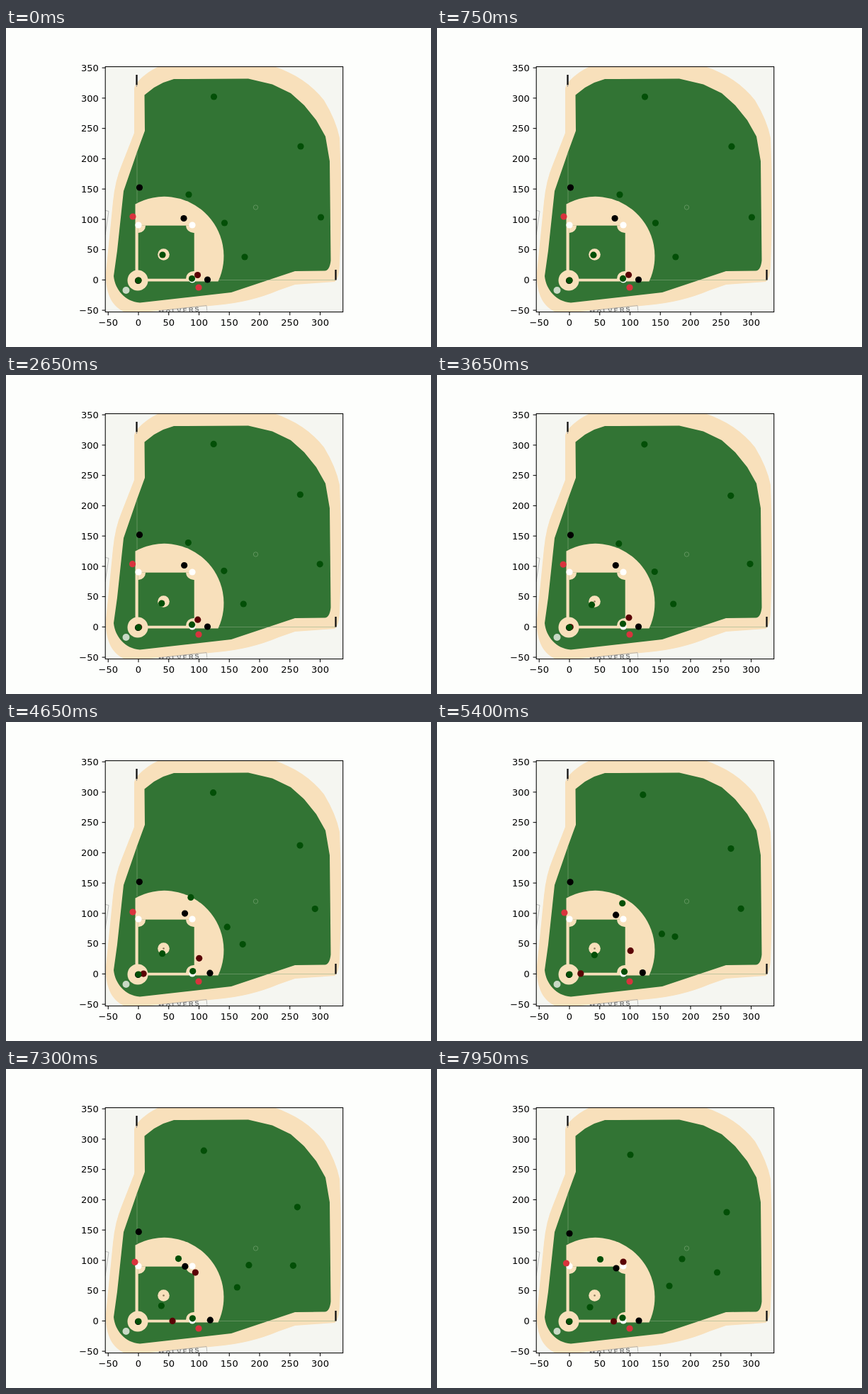
Write an HTML page that moves like this. It is 600x450 px and loops after 8000 ms.

```html
<!DOCTYPE html>
<html lang="en">
<head>
<meta charset="utf-8">
<title>Field positions</title>
<style>
  html, body { margin: 0; width: 100%; height: 100%; overflow: hidden; background: #fdfefc; }
  svg { display: block; width: 600px; height: 450px; }
  .tick { font: 13.02px "DejaVu Sans", sans-serif; fill: #000; }
  .sign { font: bold 9px "Liberation Sans", sans-serif; letter-spacing: 2.2px; fill: #777; }
</style>
</head>
<body>
<svg viewBox="0 0 600 450">
  <defs><clipPath id="plot"><rect x="140" y="54.500" width="335.700" height="346"/></clipPath></defs>
  <g clip-path="url(#plot)">
    <rect x="140" y="54" width="336" height="347" fill="#f5f6f1"/>
    <!-- warning track -->
    <path fill="#f8e0bb" d="M216 54C201 61 184 74 181 85V148L163 194Q154 215 151 245L141 345C140 373 149 394 169 401H192L298 391Q345 387 385 370L408 362L464 358Q470 354 471 335Q475 240 471 155Q466 130 449 102C432 80 408 64 378 54Z"/>
    <!-- grass -->
    <path fill="#327434" d="M195.500 94.500L209 84L222 77L237 72L342 71.500L376 79.500L402 92L421 109L438 130L451 153L457 188L458.500 328Q457 342 450 342.500L408 343L318 373L189 387.500C168 386 154 369 152 350L157 314L166 230L185 175L196 145Z"/>
    <!-- infield -->
    <path fill="#f8e0bb" d="M182.500 248.500A84 84 0 0 1 299.500 357.500H182.500Z"/>
    <rect x="186.700" y="278.700" width="79" height="75" fill="#327434"/>
    <g fill="#f8e0bb">
      <path d="M186.500 278.500h10.500a10 10 0 0 1-10.500 10.500zM266 278.500h-12a11 11 0 0 0 12 10.500zM266 354h-12a11 11 0 0 1 12-11z"/>
      <circle cx="186" cy="356" r="14.500"/>
      <circle cx="222.500" cy="319.500" r="8.300"/>
    </g>
    <circle cx="222.500" cy="319.500" r="1.300" fill="#8b765a"/>
    <g fill="none" stroke="#8fae85" stroke-width=".8">
      <path d="M185 175V246M300 355.500H465" opacity=".65"/>
      <circle cx="352.500" cy="253" r="3.200" stroke="#6c9e69"/>
    </g>
    <path d="M184.500 66V80.500M465.500 341V355.500" stroke="#111" stroke-width="2.300"/>
    <path d="M184.500 80V83" stroke="#999"/>
    <circle cx="169.500" cy="370" r="5" fill="#c9d9c5"/>
    <path d="M139 257L145 258.500L140 292M215 399L283 391.500L284 401" fill="none" stroke="#aaa" stroke-width=".8"/>
    <text class="sign" transform="translate(216 404.500) rotate(-5)">MOLVERS</text>
    <g id="dots"></g>
  </g>
  <rect x="140.200" y="54.600" width="335.500" height="346" fill="none" stroke="#000" stroke-width="1.050"/>
  <g id="axes"></g>
</svg>
<script>
const LOOP = 8000, STEP = 50, HIT = 4000;
const GREEN = '#034f07', MAROON = '#5a0205', RED = '#d8333d', BLACK = '#000', WHITE = '#fff';

function add(parent, tag, attrs, text = '') {
  const el = document.createElementNS('http://www.w3.org/2000/svg', tag);
  for (const key in attrs) el.setAttribute(key, attrs[key]);
  el.textContent = text;
  return document.getElementById(parent).appendChild(el);
}

const label = v => String(v).replace('-', '\u2212');
for (let v = -50; v <= 350; v += 50) {
  const x = 187 + v * 0.855, y = 355.4 - v * 0.855;
  add('axes', 'path', { d: `M140.2 ${y}h-4.6`, stroke: '#000', 'stroke-width': 1.05 });
  add('axes', 'text', { class: 'tick', x: 130.8, y: y + 4.8, 'text-anchor': 'end' }, label(v));
  if (v > 300) continue;
  add('axes', 'path', { d: `M${x} 400.6v4.6`, stroke: '#000', 'stroke-width': 1.05 });
  add('axes', 'text', { class: 'tick', x, y: 419.7, 'text-anchor': 'middle' }, label(v));
}

const mix = (a, b, u) => a.map((v, i) => v + (b[i] - v) * u);

// Bezier point for any number of control points.
function along(points, u) {
  while (points.length > 1) points = points.slice(1).map((p, i) => mix(points[i], p, u));
  return points[0];
}

// A dot leans from its stand to its set point, then runs a curve once the ball is hit.
const runners = [];
function dot(fill, stand, ...curve) {
  const [cx, cy] = stand;
  const el = add('dots', 'circle', { r: 4.6, fill, cx, cy });
  if (curve.length) runners.push({ el, stand, curve });
}

// Bases
dot(WHITE, [187, 278]);
dot(WHITE, [263, 278]);
dot(WHITE, [263, 355]);
// Umpires
dot(BLACK, [186.5, 356.5]);
dot(BLACK, [188.5, 225], [188.5, 226], [188, 224], [187, 232]);
dot(BLACK, [251, 268.5], [252.5, 268.5], [252.5, 273], [253, 281]);
dot(BLACK, [284.5, 355], [284.5, 355], [297, 352], [285, 355]);
// Coaches
dot(RED, [179, 266], [178, 267.5], [181, 269], [182.5, 274]);
dot(RED, [272, 366]);
// Batter and runner
dot(MAROON, [187, 356], [188.5, 355.5], [203, 354], [249.5, 356]);
dot(MAROON, [270.5, 348.5], [271, 341], [278, 320], [263, 272]);
// Fielders
dot(GREEN, [187, 356]);
dot(GREEN, [221, 320], [218, 325], [228, 330], [216, 336]);
dot(GREEN, [262.5, 353.5], [262.5, 350.5], [267, 354], [262, 351]);
dot(GREEN, [337, 323], [333, 323], [336, 294], [346, 268]);
dot(GREEN, [308.5, 275], [307, 278], [324, 316], [328, 306]);
dot(GREEN, [258, 235], [256.5, 238.5], [275, 268], [230.5, 268.5]);
dot(GREEN, [293.5, 97], [292.7, 98], [294, 102], [273, 121]);
dot(GREEN, [416, 167], [414.5, 171], [417, 179], [409, 202]);
dot(GREEN, [444.5, 267], [441.5, 266.5], [427, 254], [395.5, 287]);

function draw(now) {
  const t = Math.floor((now % LOOP) / STEP) * STEP;
  for (const { el, stand, curve } of runners) {
    const [x, y] = t < HIT
      ? mix(stand, curve[0], (t / HIT) ** 2)
      : along(curve, (t - HIT) / (LOOP - STEP - HIT));
    el.setAttribute('cx', x);
    el.setAttribute('cy', y);
  }
}

let start;
function tick(now) {
  start ??= now;
  draw(now - start);
  requestAnimationFrame(tick);
}
draw(0);
requestAnimationFrame(tick);
</script>
</body>
</html>
```
